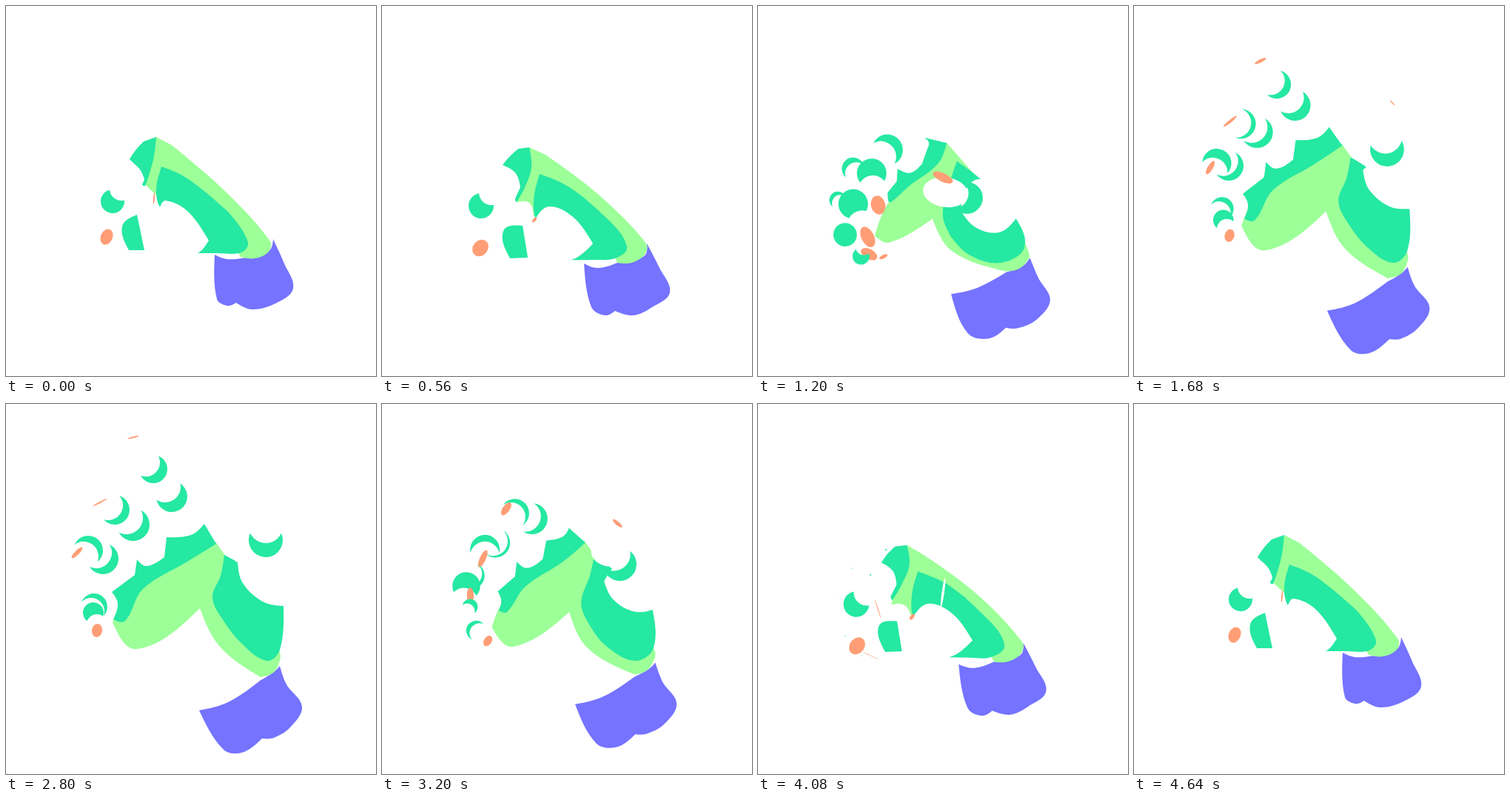
Write an HTML page with a canvas that moves like this. It is 500 by 500 pixels and loops after 4.72 s.

```html
<!DOCTYPE html>
<html lang="en">
<head>
<meta charset="utf-8">
<title>Opening hand</title>
<style>
html, body { margin: 0; width: 100%; height: 100%; overflow: hidden; background: #fff; }
canvas { display: block; }
</style>
</head>
<body>
<canvas id="stage" width="500" height="500"></canvas>
<script>
const LOOP = 4720, STEP = 80;
const TIMES = [80, 560, 1120, 1840]; // fist, loose fist, half open, open
const PURPLE = '#7573ff', LIGHT = '#9cff98', DARK = '#25e8a2', NAIL = '#ff9e76', WHITE = '#fff';
const ctx = document.getElementById('stage').getContext('2d');
const parts = [];

// Parts that lack the early poses grow in place: the third value is their size.
function add(color, trace, poses) {
  const hidden = poses[0].with(2, 0);
  while (poses.length < TIMES.length) poses.unshift(hidden);
  parts.push({ color, trace, poses });
}

// Closed outline; kinds: c = corner, s = smooth point
function outline(color, kinds, ...poses) {
  const trace = v => traceOutline(kinds, v);
  add(color, trace, poses.map(p => p.match(/\d+/g).map(Number)));
}
// Disc with an equal disc, shifted by (dx, dy), cut out of it: [x, y, r, dx, dy]
const joint = (...poses) => add(DARK, traceJoint, poses);
// Turned ellipse: [x, y, rx, ry, degrees]
const oval = (color, ...poses) => add(color, traceOval, poses);

function traceJoint([x, y, r, dx, dy]) {
  const toCut = Math.atan2(dy, dx);
  const half = Math.acos(Math.min(1, Math.hypot(dx, dy) / (2 * r || 1)));
  ctx.arc(x, y, r, toCut + half, toCut - half + 2 * Math.PI);
  if (half) ctx.arc(x + dx, y + dy, r, toCut + Math.PI + half, toCut + Math.PI - half, true);
}

function traceOval([x, y, rx, ry, degrees]) {
  ctx.ellipse(x, y, rx, ry, degrees * Math.PI / 180, 0, 2 * Math.PI);
}

function traceOutline(kinds, v) {
  const n = kinds.length;
  const pts = [...kinds].map((k, i) => [v[2 * i], v[2 * i + 1]]);
  const handle = (i, len) => {
    if (kinds[i] === 'c') return null;
    const a = pts[(i + n - 1) % n], b = pts[(i + 1) % n];
    const dx = b[0] - a[0], dy = b[1] - a[1], d = Math.hypot(dx, dy) || 1;
    return [pts[i][0] + dx / d * len, pts[i][1] + dy / d * len];
  };
  const middle = (p, q) => [(p[0] + q[0]) / 2, (p[1] + q[1]) / 2];
  ctx.moveTo(...pts[0]);
  for (let i = 0; i < n; i++) {
    const j = (i + 1) % n, p = pts[i], q = pts[j];
    const len = Math.hypot(q[0] - p[0], q[1] - p[1]) / 3;
    const out = handle(i, len), into = handle(j, -len);
    if (!out && !into) ctx.lineTo(...q);
    else ctx.bezierCurveTo(...(out || middle(p, into)), ...(into || middle(q, out)), ...q);
  }
}

// Sleeve
outline(PURPLE, 'cssssc' + 'sscscs',
  '361,315 376,348 388,382 364,402 333,410 311,401 299,405 285,396 282,336 298,342 318,341 355,331',
  '358,321 375,354 389,387 365,407 340,418 315,412 301,418 283,407 273,348 292,354 318,347 354,338',
  '367,338 379,366 394,396 375,422 350,433 333,432 310,446 283,438 261,385 295,378 334,358 358,349',
  '370,354 379,379 400,409 384,437 362,451 346,452 319,471 294,467 261,414 300,403 343,374 362,362');

// Palm
outline(LIGHT, 'ccssss' + 'csc' + 'scs',
  '203,177 224,188 299,253 357,318 355,332 337,341 317,339 262,268 204,256 195,248 188,241 195,210',
  '199,191 221,201 295,257 357,321 355,336 337,347 318,347 275,280 205,284 199,266 182,265 194,222',
  '249,184 290,227 328,262 366,335 358,350 346,356 333,357 262,332 232,288 178,317 160,311 181,262',
  '283,186 297,206 334,268 370,335 368,353 360,364 344,369 289,328 262,276 178,331 144,295 163,262');

// Thumb mound and the thumb base over it
outline(DARK, 'cscsss' + 'css',
  '210,217 245,233 300,278 327,319 318,333 285,334 253,334 208,272 203,248',
  '213,227 255,246 305,288 331,326 315,341 285,343 250,343 209,290 205,262',
  '264,211 300,238 342,285 358,326 325,347 285,338 258,315 245,282 257,230',
  '295,204 318,218 375,273 370,332 352,347 317,322 292,290 279,261 290,232');
outline(WHITE, 'csscss',
  '208,272 216,263 245,277 274,317 254,335 215,318',
  '207,288 226,271 258,285 285,321 250,344 215,325',
  '267,280 285,240 315,250 344,289 322,311 290,305',
  '313,214 340,205 375,230 377,273 347,267 320,242');

// Finger pads
outline(DARK, 'ccssscs' + 'cccsccs',
  '186,183 203,177 200,203 194,226 188,243 186,243 185,243 184,241 187,235 186,231 181,221 173,213 167,207 175,195',
  '184,193 199,191 202,218 194,243 182,265 181,264 180,263 180,260 186,247 187,245 182,228 172,219 163,215 171,205',
  '219,180 250,185 242,214 205,243 181,264 178,263 177,260 177,252 188,238 189,222 206,226 222,214 229,196 227,186',
  '268,162 284,189 245,213 185,250 161,293 145,291 151,270 143,254 174,231 177,210 190,219 214,207 217,180 250,177');

// Thumb: joint, tip, nail
joint([280, 262, 21, -20, -6], [351, 184, 23, 0, -19]);
oval(WHITE, [250, 255, 31, 20, 8], [350, 160, 22, 20, 0]);
oval(NAIL, [200, 260, 1, 8, 5], [206, 289, 2, 4, 40], [240, 243, 6, 15, -65], [362, 118, 0, 3, -40]);

// Index finger: folded segment, two joints, nail
outline(DARK, 'cccs',
  '177,282 187,330 166,330 157,298',
  '190,297 197,340 173,341 164,304',
  '152,234 152,234 152,234 152,234',
  '152,234 152,234 152,234 152,234');
joint([173, 197, 21, -9, 10], [224, 125, 21, -9, -13]);
joint([152, 231, 20, 2, 24], [199, 88, 19, -10, -9]);
oval(NAIL, [162, 277, 10, 13, -18], [172, 45, 1, 8, 75]);

// Middle finger
joint([127, 222, 14, 5, 7], [172, 163, 22, -9, -9]);
joint([144, 264, 16, 12, -17], [134, 270, 17, 14, -18], [128, 272, 20, 13, 30], [147, 143, 20, -9, -6]);
oval(NAIL, [136, 312, 8, 11, 24], [133, 327, 10, 12, 40], [149, 320, 9, 15, -30], [127, 133, 1, 11, 63]);

// Ring finger
joint([107, 264, 10, 4, 5], [131, 209, 21, -9, -8]);
joint([118, 313, 15, 0, 40], [111, 198, 20, -6, 8]);
oval(NAIL, [152, 340, 7, 12, -65], [96, 201, 3, 10, 45]);

// Little finger
joint([119, 274, 18, -4, 6]);
joint([140, 340, 11, 4, -14], [118, 282, 14, 5, 16]);
oval(NAIL, [171, 340, 2, 6, 65], [123, 306, 7, 9, 10]);

// Monotone cubic interpolation of the n-th value
function sample(poses, n, t) {
  const last = TIMES.length - 1;
  const slope = i => (poses[i + 1][n] - poses[i][n]) / (TIMES[i + 1] - TIMES[i]);
  const rate = i => {
    if (i === 0 || i === last) return 0;
    const a = slope(i - 1), b = slope(i);
    return a * b > 0 ? 2 * a * b / (a + b) : 0;
  };
  if (t <= TIMES[0]) return poses[0][n];
  if (t >= TIMES[last]) return poses[last][n];
  const i = TIMES.findIndex(time => time > t) - 1;
  const h = TIMES[i + 1] - TIMES[i], u = (t - TIMES[i]) / h, w = 1 - u;
  return poses[i][n] * (1 + 2 * u) * w * w + poses[i + 1][n] * u * u * (3 - 2 * u)
    + h * u * w * (rate(i) * w - rate(i + 1) * u);
}

const start = performance.now();

function frame() {
  const elapsed = Math.max(0, performance.now() - start) % LOOP;
  const t = Math.floor(elapsed / STEP) * STEP;
  const time = Math.min(t, LOOP - t); // closing mirrors opening
  ctx.clearRect(0, 0, 500, 500);
  for (const { color, trace, poses } of parts) {
    ctx.beginPath();
    trace(poses[0].map((_, n) => sample(poses, n, time)));
    ctx.fillStyle = color;
    ctx.fill();
  }
  requestAnimationFrame(frame);
}
frame();
</script>
</body>
</html>
```
